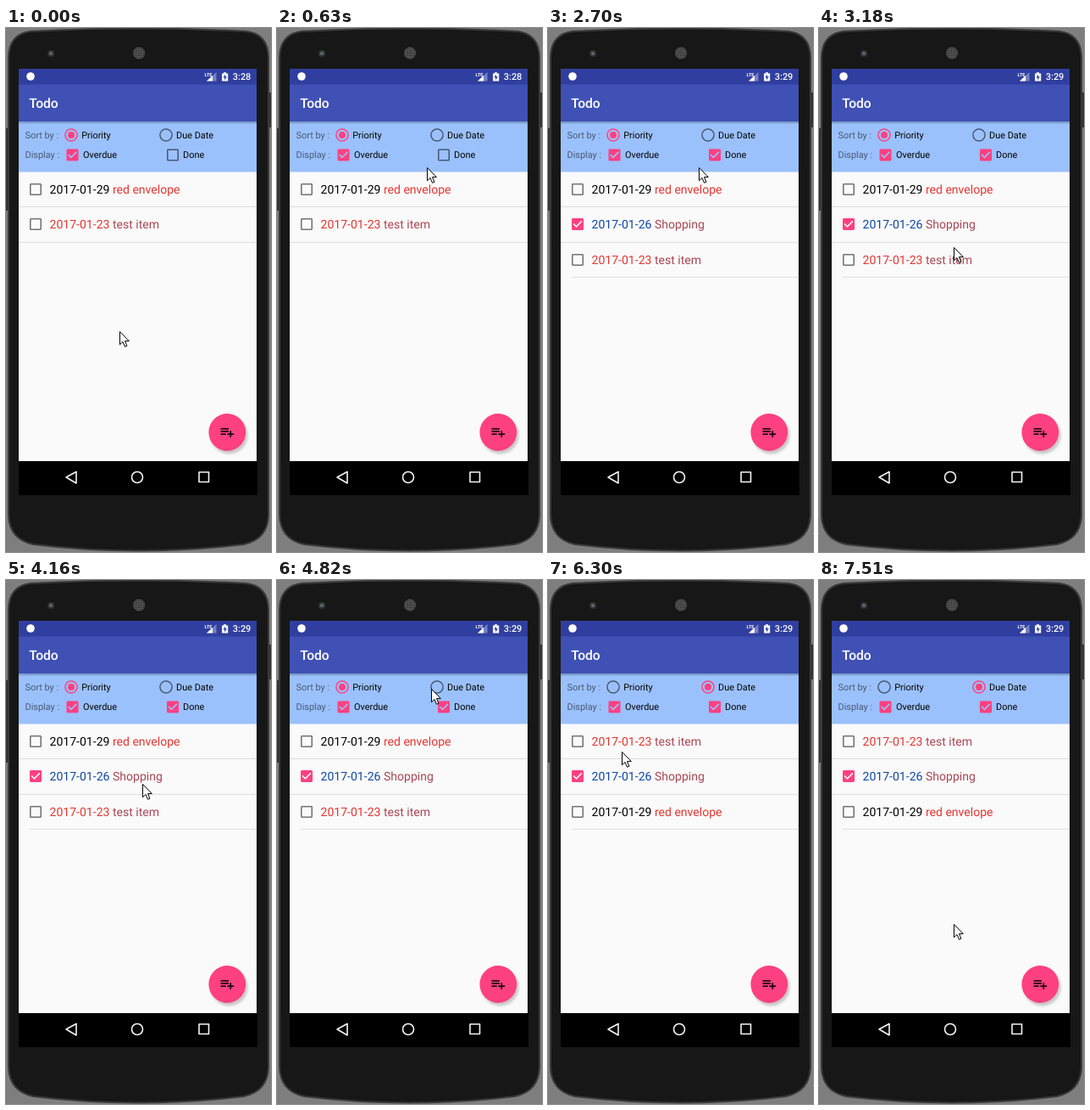
Write an HTML page that moves like this. It is 313 px wide and 617 px high and loops after 8 s.

```html
<!DOCTYPE html>
<html lang="en">
<meta charset="utf-8">
<title>Todo</title>
<style>
html, body { margin: 0; width: 100%; height: 100%; overflow: hidden; background: #7e7e7e; }
svg { display: block; width: 313px; height: 617px; font: 10.93px Roboto, sans-serif; text-rendering: geometricPrecision; }
.item { font-size: 14.05px; }
.label, .off { fill: #000; fill-opacity: .54; }
.on { fill: #ff4081; }
.red { fill: #e5352f; }
.maroon { fill: #a84654; }
.nav { fill: none; stroke: #f4f4f4; stroke-width: 1.6; stroke-linejoin: round; }
</style>
<svg viewBox="0 0 313 617">
  <defs>
    <path id="box-off" class="off" transform="scale(.78)" d="M7-7V7H-7V-7H7m0-2H-7c-1.1 0-2 .9-2 2V7c0 1.1.9 2 2 2H7c1.1 0 2-.9 2-2V-7c0-1.1-.9-2-2-2z"/>
    <path id="box-on" class="on" transform="scale(.78)" d="M7-9H-7c-1.1 0-2 .9-2 2V7c0 1.1.9 2 2 2H7c1.1 0 2-.9 2-2V-7c0-1.1-.9-2-2-2zM-2 5l-5-5 1.4-1.4L-2 2.2l7.6-7.6L7-4z"/>
    <circle id="radio-off" r="7.1" fill="none" stroke="#000" stroke-opacity=".54" stroke-width="1.5"/>
    <g id="radio-on" class="on"><circle r="7.1" fill="none" stroke="#ff4081" stroke-width="1.5"/><circle r="4"/></g>
    <linearGradient id="shade" x2="0" y2="1"><stop stop-opacity=".28"/><stop offset="1" stop-opacity="0"/></linearGradient>
    <filter id="blur" x="-50%" y="-50%" width="200%" height="200%"><feGaussianBlur stdDeviation="1.5"/></filter>
    <pattern id="mesh" width="2" height="2" patternUnits="userSpaceOnUse"><rect width="2" height="2" fill="#555"/><rect width="1" height="1" fill="#222"/></pattern>
  </defs>

  <!-- phone -->
  <path fill="#333" d="M0 118h4v97H0zM309 76h4v41h-4z"/>
  <path fill="#171717" stroke="#3a3a3a" stroke-width="2" d="M3 34Q4 7 29 4Q156-3 284 4Q309 7 310 34V574Q309 602 281 608Q156 623 32 608Q4 602 3 574Z"/>
  <circle cx="53" cy="30" r="4" fill="#333"/><circle cx="53" cy="30" r="2" fill="#62667c"/>
  <circle cx="157" cy="29.5" r="7" fill="url(#mesh)"/>

  <!-- screen -->
  <rect x="15" y="48" width="281" height="462" fill="#fafafa"/>
  <rect x="15" y="48" width="281" height="19" fill="#303f9f"/>
  <rect x="15" y="66.5" width="281" height="43.5" fill="#3f51b5"/>
  <rect x="15" y="110" width="281" height="59.5" fill="#9bc1fc"/>
  <rect x="15" y="110" width="281" height="3.5" fill="url(#shade)"/>
  <rect x="15" y="510" width="282" height="40"/>

  <!-- status and title -->
  <g fill="#fff">
    <circle cx="29" cy="57" r="4.8"/>
    <text x="234.5" y="56.5" font-size="5.5" font-weight="700">LTE</text>
    <path opacity=".35" d="M237 62.5H248.5V52z"/><path d="M237 62.5H244V56z"/>
    <path d="M255 53.5h2v-1.2h3v1.2h2.2v9H255z"/>
    <path fill="#303f9f" d="M259 54.5l-2.6 4h1.8v3l2.7-4.2H259z"/>
    <text id="clock" x="267.8" y="61" font-weight="500"></text>
    <text x="27.3" y="94.3" font-size="15.6" font-weight="500">Todo</text>
  </g>

  <!-- filters -->
  <circle id="ripple" class="on"/>
  <text class="label" x="22.5" y="129.7">Sort by :</text>
  <text class="label" x="22.5" y="153.4">Display :</text>
  <text x="89.2" y="129.7">Priority</text>
  <text x="201" y="129.7">Due Date</text>
  <text x="91" y="153.4">Overdue</text>
  <text x="209" y="153.4">Done</text>
  <use id="priority" x="77" y="126"/>
  <use id="due" x="189" y="126"/>
  <use href="#box-on" x="78.5" y="149.5"/>
  <use id="done" x="197" y="149.5"/>

  <!-- list -->
  <path stroke="#dedede" d="M15 210.5H296M15 252.5H296"/>
  <path id="line" stroke="#dedede" d="M28 293.5H296"/>
  <g id="envelope" class="item"><use href="#box-off" x="35"/><text x="51.5" y="5">2017-01-29 <tspan class="red">red envelope</tspan></text></g>
  <g id="shopping" class="item"><use href="#box-on" x="35"/><text x="51.5" y="5" fill="#0d47a1">2017-01-26 <tspan class="maroon">Shopping</tspan></text></g>
  <g id="test" class="item"><use href="#box-off" x="35"/><text x="51.5" y="5" class="red">2017-01-23 <tspan class="maroon">test item</tspan></text></g>

  <!-- add button and navigation -->
  <circle cx="263.5" cy="479.5" r="22" opacity=".2" filter="url(#blur)"/>
  <circle cx="261.3" cy="476" r="21.9" class="on"/>
  <path transform="translate(252 466.5) scale(.78)" d="M14 10H2v2h12zM14 6H2v2h12zM18 14v-4h-2v4h-4v2h4v4h2v-4h4v-2zM2 16h8v-2H2z"/>
  <path class="nav" d="M71 529L83 522.5V536ZM228 523h11.5v11.5H228z"/>
  <circle class="nav" cx="155" cy="529" r="6.5"/>

  <path id="cursor" fill="#fff" stroke="#000" stroke-linejoin="round" d="M.5.5V15.8L4 12.5 6.5 18.3 8.9 17.3 6.5 11.6H11.3Z"/>
</svg>
<script>
const LOOP = 8000, TICK = 134;
const SHOW_DONE = 1490, SORT_BY_DUE = 5340, NEW_MINUTE = 2270;
const ROW_TOP = 190, ROW_PITCH = 41.3;

// Pointer strokes: start, end, curve handle, destination
const home = [134, 357];
const strokes = [
  [-14, 1210, [183, 97], [195, 148]],
  [2140, 2270, [192, 139], [189, 130]],
  [2570, 3480, [148, 257], [163, 279]],
  [3630, 3880, [158, 279], [156, 280]],
  [4030, 5060, [176, 110], [189, 123]],
  [5740, 6820, [32, 216], [94, 252]],
  [6960, 7510, [191, 340], [159, 405]]
];

const set = (id, attrs) => {
  for (const name in attrs) document.getElementById(id).setAttribute(name, attrs[name]);
};

// The pointer jumps along each curve once per tick
function pointerAt(t) {
  let at = home;
  for (const [start, end, handle, to] of strokes) {
    if (t < start) break;
    const jumps = Math.round((end - start) / TICK);
    const u = Math.min(1, Math.floor((t - start) / (end - start) * jumps + 0.35) / jumps);
    const v = 1 - u;
    at = at.map((from, i) => Math.round(v * v * from + 2 * u * v * handle[i] + u * u * to[i]));
  }
  return at;
}

function drawRipple(t) {
  const onRadio = t >= SORT_BY_DUE;
  const p = onRadio ? (t - SORT_BY_DUE) / (2 * TICK) : (t - SHOW_DONE) / (3 * TICK);
  set("ripple", {
    cx: onRadio ? 189 : 197,
    cy: onRadio ? 126 : 149.5,
    r: 16,
    opacity: p >= 0 && p < 1 ? 0.25 * (1 - p) : 0
  });
}

function drawList(t) {
  const full = t >= SHOW_DONE + TICK;
  const order = full ? ["envelope", "shopping", "test"] : ["envelope", "test"];
  if (t >= SORT_BY_DUE + TICK) order.reverse();
  order.forEach((id, i) => set(id, { transform: `translate(0 ${Math.round(ROW_TOP + i * ROW_PITCH)})` }));
  for (const id of ["shopping", "line"]) set(id, { visibility: full ? "visible" : "hidden" });
}

function draw(now) {
  const t = now % LOOP;
  const byDue = t >= SORT_BY_DUE;
  set("priority", { href: byDue ? "#radio-off" : "#radio-on" });
  set("due", { href: byDue ? "#radio-on" : "#radio-off" });
  set("done", { href: t >= SHOW_DONE ? "#box-on" : "#box-off" });
  document.getElementById("clock").textContent = t < NEW_MINUTE ? "3:28" : "3:29";
  drawRipple(t);
  drawList(t);
  set("cursor", { transform: `translate(${pointerAt(t)})` });
  requestAnimationFrame(() => draw(performance.now()));
}
draw(0);
</script>
</html>
```
